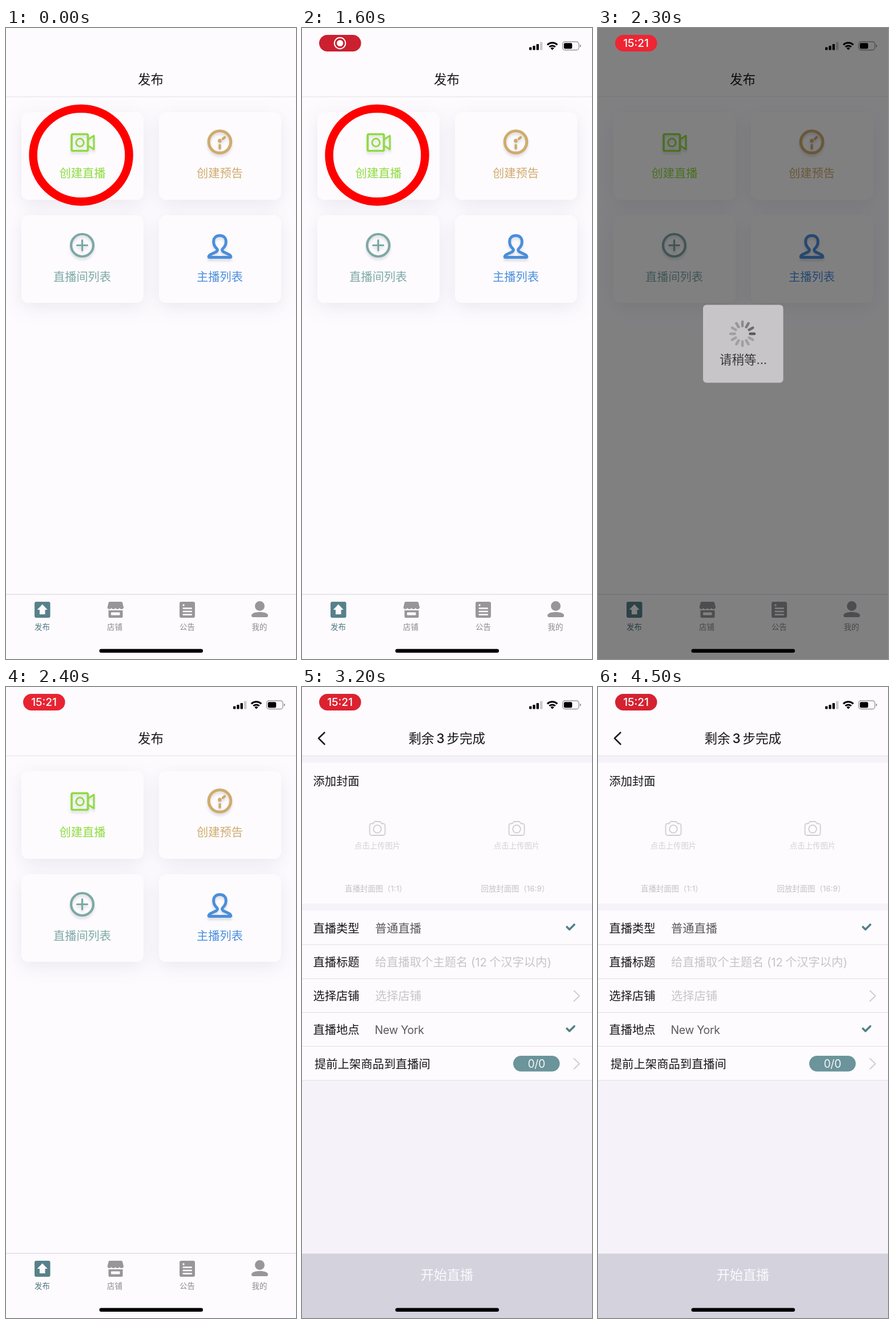
An HTML page for the animation above (4.6 s loop, 508 px wide and 1102 px high).

```html
<!DOCTYPE html>
<html lang="zh-CN">
<head>
<meta charset="utf-8">
<title>创建直播</title>
<style>
  @property --p { syntax: "<number>"; inherits: true; initial-value: 1; }

  html, body { margin: 0; width: 100%; height: 100%; overflow: hidden; background: #fdfbfe; }
  svg { display: block; width: 508px; height: 1102px; animation: push 4.6s step-end infinite; }
  text { font: 400 20.3px Inter, "Noto Sans CJK SC", "Noto Sans CJK", sans-serif; fill: #161517; }
  .mid { text-anchor: middle; }
  .title { font-size: 22.5px; font-weight: 500; text-anchor: middle; }
  .card text { font-weight: 500; text-anchor: middle; font-size: 20.2px; }
  .tabs text { font-size: 13.4px; text-anchor: middle; fill: #8c8a8e; }
  .value { fill: #5b595d; }
  .hint { fill: #c6c4c8; }
  .tiny { font-size: 13.4px; fill: #c4c2c6; }
  .pale { fill: #d3d1d4; text-anchor: middle; }
  .latin { font-size: 19.4px; letter-spacing: -.3px; }
  .line { fill: none; stroke-linecap: round; stroke-linejoin: round; }
  .icon { filter: drop-shadow(0 4px 2px rgba(90, 100, 110, .2)); }
  .shadow { filter: drop-shadow(0 8px 16px rgba(80, 80, 120, .11)); }

  /* --p is the uncovered share of the screen during the push */
  .home { transform: translateX(calc((var(--p) - 1) * 152.4px)); }
  .shade { opacity: calc((1 - var(--p)) * .09); }
  .form { transform: translateX(calc(var(--p) * 508px)); }
  .old { transform: translateX(calc((var(--p) - 1) * 150px)); opacity: calc(var(--p) * 2 - .4); }
  .new { transform: translateX(calc(var(--p) * 294px)); }
  .new, .back { opacity: calc(1.06 - var(--p) * 1.06); }

  .status { animation: status 4.6s step-end infinite; }
  .ring { animation: ring 4.6s step-end infinite; }
  .dim { animation: dim 4.6s step-end infinite; }
  .rec { animation: rec 4.6s step-end infinite; }
  .clock { animation: clock 4.6s step-end infinite; }
  .empty { animation: empty 4.6s step-end infinite; }
  .filled { animation: filled 4.6s step-end infinite; }
  .pill { animation: pulse 4.6s ease-in-out infinite; }
  .spin { transform-origin: 253px 534px; animation: spin 4.6s steps(55) infinite; }

  @keyframes push {
    0% { --p: 1; } 54.1% { --p: .34; } 56.3% { --p: .063; }
    58.5% { --p: .009; } 60.6%, 100% { --p: 0; }
  }
  @keyframes status { 0% { opacity: 0; } 2%, 100% { opacity: 1; } }
  @keyframes ring { 0% { opacity: 1; } 36.7%, 100% { opacity: 0; } }
  @keyframes dim { 0% { opacity: 0; } 38.9% { opacity: .5; } 41.1% { opacity: 1; } 51.9%, 100% { opacity: 0; } }
  @keyframes rec { 0% { opacity: 1; } 41.1%, 100% { opacity: 0; } }
  @keyframes clock { 0% { opacity: 0; } 41.1%, 100% { opacity: 1; } }
  @keyframes empty { 0% { opacity: 1; } 67.2%, 100% { opacity: 0; } }
  @keyframes filled { 0% { opacity: 0; } 67.2%, 100% { opacity: 1; } }
  @keyframes pulse {
    0%, 100% { fill: #d62231; }
    3.3%, 32.8%, 62.4%, 92% { fill: #ca2030; }
    18%, 47.6%, 77.2% { fill: #f02532; }
  }
  @keyframes spin { to { transform: rotate(1650deg); } }
</style>
</head>
<body>
<svg viewBox="0 0 508 1102">
  <defs>
    <rect id="card" width="214" height="153" rx="12" fill="#fdfbfe"/>
    <path id="tick" class="line" d="M464 419l4.5 4.5 8.500-8.500" stroke="#528088" stroke-width="3.6"/>
    <path id="more" class="line" d="M476.500 530.500l9.500 9-9.500 9" stroke="#cfcdd0" stroke-width="2"/>
    <g id="photo" class="line" stroke="#cfcdd0" stroke-width="1.800">
      <path d="M122 238.500h2.500l2.500-3.500h10l2.500 3.500h2.500a3.500 3.500 0 0 1 3.500 3.500v13.500a3.500 3.500 0 0 1-3.500 3.500h-20a3.500 3.500 0 0 1-3.500-3.500V242a3.500 3.500 0 0 1 3.500-3.500z"/>
      <circle cx="132" cy="248" r="6.800"/>
    </g>
    <path id="spoke" d="M253 520.500v-7.500" stroke-width="4.600" stroke-linecap="round"/>
  </defs>

  <g class="home">
    <rect width="508" height="1102" fill="#fdfbfe"/>
    <g class="shadow">
      <use href="#card" x="27" y="147"/>
      <use href="#card" x="268" y="147"/>
      <use href="#card" x="27" y="327"/>
      <use href="#card" x="268" y="327"/>
    </g>

    <g class="card">
      <g class="icon line" stroke="#8edb3f" stroke-width="3.600">
        <rect x="115" y="185.500" width="28.500" height="29" rx="2"/>
        <circle cx="129.500" cy="200" r="6.800" stroke-width="2.800"/>
        <path d="M144 194.500l10-6.500v24l-10-6.500" stroke-width="3"/>
      </g>
      <text x="134" y="261" style="fill:#8edb3f">创建直播</text>

      <g class="icon line" stroke="#cfab6c" stroke-width="4.500">
        <circle cx="374.500" cy="199" r="19.300" stroke-width="5"/>
        <path d="M374.500 205v5M380 193.500l3-2.500"/>
        <circle cx="374.500" cy="197" r="3.400" fill="#cfab6c" stroke="none"/>
      </g>
      <text x="374.500" y="261" style="fill:#cfab6c">创建预告</text>

      <g class="icon line" stroke="#7da8a6" stroke-width="3.200">
        <circle cx="133.500" cy="379.500" r="19.500" stroke-width="4.200"/>
        <path d="M124.500 379.500h18M133.500 370.500v18"/>
      </g>
      <text x="133.500" y="442" style="fill:#7da8a6">直播间列表</text>

      <path class="icon line" stroke="#4a8edb" stroke-width="5" d="M369.500 385.500C361 378 361 362.500 374.500 362.500S388 378 379.500 385.500c-1.500 2-1 4 1.500 5.500l10.500 5c3 2 3 4.500 1 4.500h-36c-2 0-2-2.500 1-4.500l10.500-5c2.500-1.500 3-3.500 1.500-5.500z"/>
      <text x="374.500" y="442" style="fill:#4a8edb">主播列表</text>
    </g>

    <g class="tabs" fill="#98969a">
      <rect y="988.500" width="508" height="1.300" fill="#dcdadf"/>
      <rect x="50" y="1002" width="27.500" height="28" rx="3" fill="#57818a"/>
      <path d="M63.700 1006.500l9 9.500h-4.200v8h-9.600v-8h-4.200z" fill="#fdfbfe"/>
      <text x="63.500" y="1050.500" style="fill:#4d7780">发布</text>

      <path d="M181.500 1002h20.500q1.500 0 2 1.500l2 8q0 3-3.500 3.500-2.500 0-3.800-2-1.200 2-3.500 2t-3.500-2q-1.200 2-3.500 2t-3.500-2q-1.300 2-3.700 2-3.300-.5-3.300-3.500l2-8q.5-1.500 1.800-1.500z"/>
      <path d="M179.500 1017h25v10.500q0 2.500-2.500 2.500h-20q-2.500 0-2.500-2.500z"/>
      <rect x="184" y="1020.500" width="15.500" height="5" rx="1" fill="#fdfbfe"/>
      <text x="190.500" y="1050.500">店铺</text>

      <rect x="304" y="1002" width="27" height="28" rx="3"/>
      <circle cx="311" cy="1008" r="1.700" fill="#fdfbfe"/>
      <path class="line" d="M310.500 1013.500h14.500M310.500 1019h14.500M310.500 1024.500h14.500" stroke="#fdfbfe" stroke-width="2.300"/>
      <text x="317.500" y="1050.500">公告</text>

      <circle cx="444.500" cy="1009.500" r="8.500"/>
      <path d="M430 1026c0-4 7-6 14.500-6s14.500 2 14.500 6c0 2-1 3-3 3h-23c-2 0-3-1-3-3z"/>
      <text x="444" y="1050.500">我的</text>
    </g>
    <ellipse class="ring" cx="131.500" cy="222" rx="84" ry="81.300" fill="none" stroke="#fe0000" stroke-width="14.500"/>
    <rect class="shade" width="508" height="1102"/>
  </g>

  <g class="form">
    <rect width="508" height="1102" fill="#f5f3f9"/>
    <path d="M0 132.500h508V378H0zM0 390.500h508V687H0z" fill="#fdfbfe"/>
    <path d="M0 450h508M0 509.500h508M0 568.500h508M0 627.500h508M0 687h508" stroke="#e0dee2" stroke-width="1.200"/>

    <text x="19.500" y="171.500">添加封面</text>
    <use href="#photo"/>
    <use href="#photo" x="244"/>
    <text class="tiny pale" x="132" y="282">点击上传图片</text>
    <text class="tiny pale" x="376" y="282">点击上传图片</text>
    <text class="tiny" x="75" y="357">直播封面图（1:1）</text>
    <text class="tiny" x="313.500" y="357">回放封面图（16:9）</text>

    <text x="19.500" y="428.500">直播类型</text>
    <text class="value" x="128" y="428.500">普通直播</text>
    <use href="#tick"/>

    <text x="19.500" y="488">直播标题</text>
    <text class="hint" x="128" y="488">给直播取个主题名 (12<tspan dx="4">个汉字以内)</tspan></text>

    <text x="19.500" y="547">选择店铺</text>
    <text class="hint" x="128" y="547">选择店铺</text>
    <use href="#more"/>

    <text x="19.500" y="606">直播地点</text>
    <text class="hint empty" x="128" y="606">填写直播间所在的城市</text>
    <g class="filled">
      <text class="value latin" x="127.500" y="606">New York</text>
      <use href="#tick" y="177.500"/>
    </g>

    <text x="22" y="665.500">提前上架商品到直播间</text>
    <rect x="370" y="644" width="81.500" height="27.500" rx="13.700" fill="#6b949b"/>
    <text class="latin mid" x="410.700" y="665" style="fill:#f3f5f8">0/0</text>
    <use href="#more" y="118.500"/>

    <rect y="989.500" width="508" height="112.500" fill="#d4d2dd"/>
    <text class="mid" x="254" y="1034.500" style="font-size:23px;fill:#faf9fc">开始直播</text>
  </g>

  <g>
    <rect width="508" height="120" fill="#fdfbfe"/>
    <rect y="119.500" width="508" height="1.200" fill="#e6e4e9"/>
    <text class="title old" x="253.500" y="98.300">发布</text>
    <g class="new">
      <text class="title empty" x="253.800" y="98.300">剩余<tspan dx="4">4</tspan><tspan dx="4">步完成</tspan></text>
      <text class="title filled" x="253.800" y="98.300">剩余<tspan dx="4">3</tspan><tspan dx="4">步完成</tspan></text>
    </g>
    <path class="line back" d="M39.500 79.500l-10.500 10 10.500 10.500" stroke="#1c1b1d" stroke-width="2.500"/>
  </g>

  <g class="dim">
    <rect width="508" height="1102" fill-opacity=".49"/>
    <rect x="184" y="483.500" width="140.500" height="136" rx="6" fill="#c8c5c9"/>
    <g class="spin" stroke="#a19fa2">
      <use href="#spoke" stroke="#5b5a5c"/>
      <use href="#spoke" transform="rotate(-30 253 534)" stroke="#6c6b6d"/>
      <use href="#spoke" transform="rotate(-60 253 534)" stroke="#7d7c7e"/>
      <use href="#spoke" transform="rotate(-90 253 534)" stroke="#8d8b8e"/>
      <use href="#spoke" transform="rotate(-120 253 534)" stroke="#989699"/>
      <use href="#spoke" transform="rotate(-150 253 534)"/>
      <use href="#spoke" transform="rotate(180 253 534)"/>
      <use href="#spoke" transform="rotate(150 253 534)"/>
      <use href="#spoke" transform="rotate(120 253 534)"/>
      <use href="#spoke" transform="rotate(90 253 534)"/>
      <use href="#spoke" transform="rotate(60 253 534)"/>
      <use href="#spoke" transform="rotate(30 253 534)"/>
    </g>
    <text class="mid" x="254.500" y="587" style="font-size:21.5px;fill:#39383a">请稍等...</text>
  </g>

  <g class="status">
    <rect class="pill" x="30" y="12" width="73.500" height="29" rx="14.500"/>
    <g class="rec">
      <circle cx="66.500" cy="26.500" r="9.700" fill="none" stroke="#fff" stroke-width="2"/>
      <circle cx="66.500" cy="26.500" r="5.600" fill="#fff"/>
    </g>
    <text class="clock mid" x="66.500" y="33.300" style="font-size:19px;font-weight:500;fill:#fff">15:21</text>

    <rect x="398" y="33.500" width="4.300" height="5" rx="1"/>
    <rect x="404.300" y="31" width="4.300" height="7.500" rx="1"/>
    <rect x="410.600" y="28" width="4.300" height="10.500" rx="1"/>
    <rect x="417" y="24.500" width="4.300" height="14" rx="1" fill-opacity=".2"/>
    <g fill="none" stroke="#000" stroke-width="3">
      <path d="M429.800 29.300a12.500 12.500 0 0 1 17.400 0M433.300 33a7.500 7.500 0 0 1 10.400 0"/>
    </g>
    <path d="M438.500 38.500l-3.200-3.200a4.600 4.600 0 0 1 6.400 0z"/>
    <rect x="456.500" y="24" width="28.500" height="14.500" rx="4.200" fill="none" stroke="#000" stroke-opacity=".4" stroke-width="1.300"/>
    <rect x="458.700" y="26.200" width="14.500" height="10.100" rx="2.200"/>
    <path d="M486.800 28.800q2 .8 2 2.500t-2 2.500z" fill-opacity=".45"/>
  </g>
  <rect x="163.500" y="1084.500" width="181.500" height="6.500" rx="3.200"/>
</svg>
</body>
</html>
```
